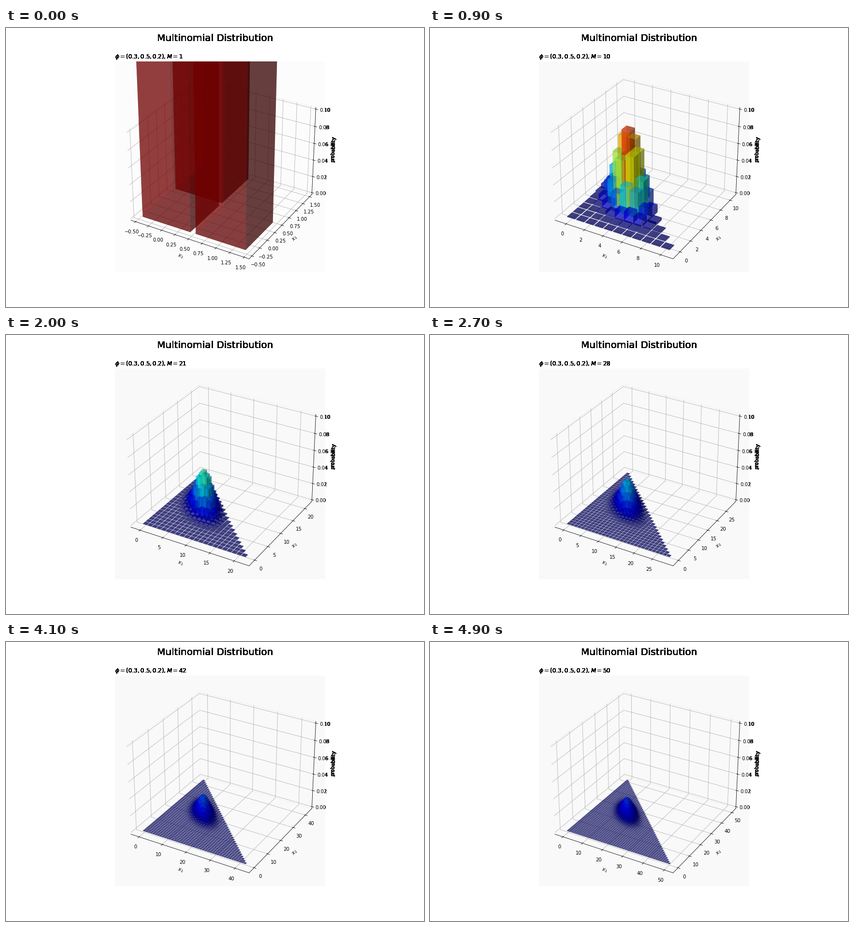
A matplotlib script that plays this animation: 864x576 px, repeating every 5000 ms.

```python
import math

import matplotlib.pyplot as plt
import numpy as np
from matplotlib.animation import FuncAnimation
from matplotlib.artist import Artist
from matplotlib.ticker import MaxNLocator
from matplotlib.transforms import Bbox

PHI = (0.3, 0.5, 0.2)
MAX_TRIALS = 50
BAR_WIDTH = 0.9
Z_TOP = 0.1
PASSES = 16

plt.rcParams.update({"font.family": "DejaVu Sans", "font.size": 10})
fig = plt.figure(figsize=(12, 8), dpi=72, facecolor="white")
fig.subplots_adjust(left=0.125, right=0.9, bottom=0.125, top=0.88)
ax = fig.add_subplot(projection="3d")
heading = fig.suptitle("Multinomial Distribution", fontsize=20)


class Overprint(Artist):
    """Redraws text outside the axes square so its soft edges turn solid."""

    zorder = 10
    right_band = Bbox([[660, 0], [864, 576]])
    subtitle = None

    def draw(self, renderer):
        for text in (heading, self.subtitle):
            self.repeat(text, renderer)
        labels = [tick.label1 for tick in ax.zaxis.majorTicks]
        for text in (ax.zaxis.label, *labels):
            text.set_clip_box(self.right_band)
            text.set_clip_on(True)
            self.repeat(text, renderer)
            text.set_clip_on(False)

    @staticmethod
    def repeat(text, renderer):
        for _ in range(PASSES):
            text.draw(renderer)


overprint = Overprint()
fig.add_artist(overprint)


def probability(m, a, b):
    c = m - a - b
    ways = math.comb(m, a) * math.comb(m - a, b)
    return ways * PHI[0] ** a * PHI[1] ** b * PHI[2] ** c


def widen(low, high, share):
    pad = (high - low) * share
    return low - pad, high + pad


def style_axes(m, tone):
    half = BAR_WIDTH / 2
    low, high = widen(-half, m + half, 0.05)
    locator = MaxNLocator(nbins=9, steps=[1, 2, 2.5, 5, 10])
    ticks = [t for t in locator.tick_values(low, high) if low <= t <= high]
    ax.set_xticks(ticks)
    ax.set_yticks(ticks)
    heights = np.linspace(0, Z_TOP, 6)
    ax.set_zticks(heights, [f"{h:.2f}" for h in heights])

    # The visible box reaches 1/48 past the limits on each side.
    ax.set_xlim(*widen(low, high, 1 / 48))
    ax.set_ylim(*widen(low, high, 1 / 48))
    ax.set_zlim(*widen(0, Z_TOP, 1 / 48))

    ax.set_facecolor((tone,) * 3)
    for axis in (ax.xaxis, ax.yaxis, ax.zaxis):
        axis.pane.set(facecolor=(tone,) * 3, edgecolor="#f1f1f1", alpha=1)
    ax.set_xlabel("$x_1$")
    ax.set_ylabel("$x_2$")
    ax.set_zlabel("probability")


def update(i):
    m = i + 1
    ax.clear()
    cells = [(a, b) for a in range(m + 1) for b in range(m + 1 - a)]
    x, y = np.array(cells).T
    p = np.array([probability(m, a, b) for a, b in cells])
    ax.bar3d(x - BAR_WIDTH / 2, y - BAR_WIDTH / 2, np.zeros_like(p),
             BAR_WIDTH, BAR_WIDTH, p,
             color=plt.cm.jet(p / Z_TOP), alpha=0.5, shade=True)
    style_axes(m, max(249, 252 - i // 2) / 255)
    overprint.subtitle = ax.set_title(
        rf"$\phi=(0.3, 0.5, 0.2), M={m}$", loc="left", fontsize=12, y=1.0)
    return []


animation = FuncAnimation(fig, update, frames=MAX_TRIALS, interval=100,
                          init_func=lambda: update(0), repeat=True,
                          repeat_delay=0, blit=False)
plt.show()
```
